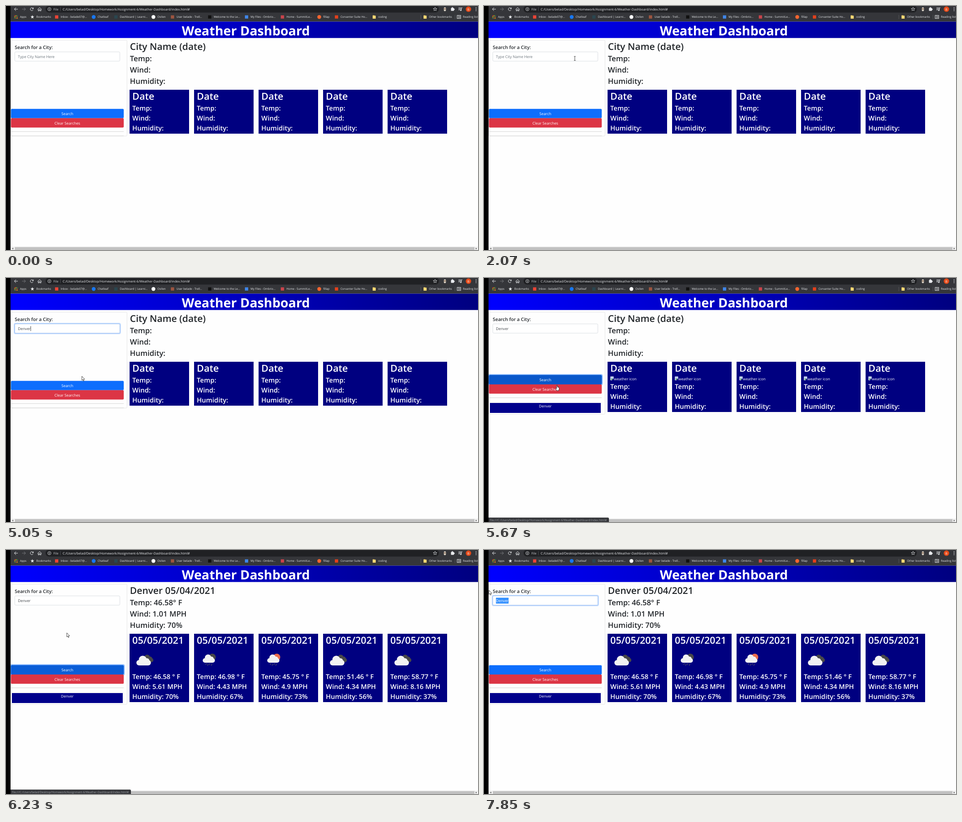
These frames come from a looping animation (1039x539 px, 8000 ms). An HTML page with a canvas:

```html
<!DOCTYPE html>
<html lang="en">
<head>
<meta charset="utf-8">
<title>Weather Dashboard</title>
<style>
  html, body { margin: 0; width: 100%; height: 100%; overflow: hidden; background: #fff; }
  canvas { display: block; width: 1039px; height: 539px; }
</style>
</head>
<body>
<canvas id="stage"></canvas>
<script>
const W = 1039, H = 539, LOOP = 8000;
const canvas = document.getElementById('stage');
const c = canvas.getContext('2d');
const dpr = window.devicePixelRatio || 1;
canvas.width = W * dpr;
canvas.height = H * dpr;

const FAMILY = '"Open Sans", "Noto Sans", sans-serif';
const PATH = 'C:/Users/belad/Desktop/Homework/Assignment-6/Weather-Dashboard/index.html#';
const INK = '#212529', PALE = '#e8eaed';

// Moments of the story, in ms
const FOCUS = 2220, HOVER = 5290, PRESS = 5500, LISTED = 5665, OVER_CLEAR = 5740,
      LEAVE = 6060, LOADED = 6225, DRAG = 7300;
const TYPED = [3170, 3400, 3470, 3640, 3870, 4040];

// Pointer moves: start, end, steps, target x, target y
const MOVES = [
  [140, 370, 4, 663, 423],
  [680, 1000, 5, 378, 236],
  [1230, 2000, 11, 200, 116],
  [2070, 2390, 5, 199, 114],
  [4730, 4880, 3, 167, 217],
  [5220, 5450, 4, 160, 237],
  [6060, 6290, 4, 129, 173],
  [6460, 7230, 11, 85, 113.5],
  [7300, 7690, 6, 4, 83],
  [7770, 7850, 2, 11, 89]
];

const FORECAST = [
  ['46.58', '5.61', 70, 'clouds'],
  ['46.98', '4.43', 67, 'night'],
  ['45.75', '4.9', 73, 'day'],
  ['51.46', '4.34', 56, 'clouds'],
  ['58.77', '8.16', 37, 'clouds']
];

// Bookmarks: icon x, text, icon shape, colour
const BOOKMARKS = [
  [22, 'Apps', 'grid'],
  [58, 'Bookmarks', 'star', PALE],
  [111.5, 'Inbox - belade07@...', 'square', '#ea4335'],
  [193, 'Chatleaf', 'disc', '#1877f2'],
  [242, 'Dashboard | Learni...', 'square', '#2a4650'],
  [324.5, 'Ovilen', 'disc', '#fff'],
  [366.5, 'User belade - Trell...', 'square', '#9c5540'],
  [448.5, 'Welcome to the Le...', 'square', '#111'],
  [529.5, 'My Files - Ombrio...', 'square', '#3f86e8'],
  [608.5, 'Home - SummitLe...', 'square', '#c9434b'],
  [689.5, 'fillap', 'disc', '#f4652f'],
  [727.5, 'Corvanter Suite Ho...', 'square', '#e2401b'],
  [810.5, 'coding', 'folder', '#f7d774'],
  [922.5, 'Other bookmarks', 'folder', '#f7d774'],
  [997, 'Reading list', 'list', PALE]
];

const ramp = (t, from, span = 150) => Math.min(1, Math.max(0, (t - from) / span));
const ease = k => k * k * (3 - 2 * k);

function font(size, weight = 400) {
  c.font = `${weight} ${size}px ${FAMILY}`;
}
function text(str, x, y, size, color, weight, align = 'left') {
  font(size, weight);
  c.textAlign = align;
  c.fillStyle = color;
  c.fillText(str, x, y);
}
function box(x, y, w, h, color) {
  c.fillStyle = color;
  c.fillRect(x, y, w, h);
}
function round(x, y, w, h, r) {
  c.beginPath();
  c.roundRect(x, y, w, h, r);
}
function fillRound(x, y, w, h, r, color) {
  round(x, y, w, h, r);
  c.fillStyle = color;
  c.fill();
}
function disc(x, y, r, color) {
  c.beginPath();
  c.arc(x, y, r, 0, 7);
  c.fillStyle = color;
  c.fill();
}
function trace(points) {
  c.beginPath();
  points.forEach(([x, y], i) => i ? c.lineTo(x, y) : c.moveTo(x, y));
}
function line(points, color, width = 1) {
  trace(points);
  c.strokeStyle = color;
  c.lineWidth = width;
  c.stroke();
}
function at(x, y, draw) {
  c.save();
  c.translate(x, y);
  draw();
  c.restore();
}
function starPath(r) {
  const pts = [];
  for (let i = 0; i < 10; i++) {
    const a = i * Math.PI / 5 - Math.PI / 2, d = i % 2 ? r * 0.42 : r;
    pts.push([Math.cos(a) * d, Math.sin(a) * d]);
  }
  trace(pts);
  c.closePath();
}

const ICONS = {
  grid() {
    const hues = ['#ea4335', '#fbbc04', '#34a853'];
    for (let i = 0; i < 9; i++) box(-3.6 + i % 3 * 2.7, -3.6 + (i / 3 | 0) * 2.7, 1.8, 1.8, hues[(i + (i / 3 | 0)) % 3]);
  },
  star(color) {
    starPath(4.3);
    c.fillStyle = color;
    c.fill();
  },
  square(color) { box(-3.6, -3.6, 7.2, 7.2, color); },
  disc(color) { disc(0, 0, 4.2, color); },
  folder(color) {
    fillRound(-3.4, -3.8, 4, 3, 0.6, '#d9b452');
    fillRound(-3.4, -3, 6.8, 6.8, 0.6, color);
  },
  list(color) {
    c.strokeStyle = color;
    c.lineWidth = 0.9;
    c.strokeRect(-4, -3.5, 8, 7);
    line([[-1.3, -3.5], [-1.3, 3.5]], color, 0.8);
    for (const y of [-1.6, 0, 1.6]) line([[0, y], [3, y]], color, 0.7);
  }
};

function toolbar() {
  box(10, 0, W - 10, 34.5, '#35363a');
  fillRound(87, -1, 866, 15.4, 7.7, '#202124');

  line([[26, 7], [18.5, 7]], PALE);
  line([[22, 3.4], [18.4, 7], [22, 10.6]], PALE);
  line([[35.5, 7], [43, 7]], '#77797d');
  line([[39.5, 3.4], [43.1, 7], [39.5, 10.6]], '#77797d');
  c.beginPath();
  c.arc(56.8, 7, 3.3, 0.5, 5.5);
  c.strokeStyle = PALE;
  c.lineWidth = 1;
  c.stroke();
  trace([[60.6, 3], [60.6, 6.6], [57, 6.6]]);
  c.fillStyle = PALE;
  c.fill();
  line([[69.6, 7.6], [74, 3.4], [78.4, 7.6]], PALE);
  line([[71, 7], [71, 10.8], [73, 10.8], [73, 8], [75, 8], [75, 10.8], [77, 10.8], [77, 7]], PALE);
  c.beginPath();
  c.arc(95.5, 7, 3.5, 0, 7);
  c.lineWidth = 0.8;
  c.stroke();
  box(95, 6.3, 1, 2.8, PALE);
  box(95, 4.8, 1, 1, PALE);
  text('File', 104.3, 9.6, 7.17, '#c4c7cb');
  box(119.5, 2.5, 0.7, 9, '#5f6368');
  text(PATH, 124.8, 9.6, 7.17, PALE);

  at(944.5, 7, () => {
    starPath(4.2);
    c.strokeStyle = PALE;
    c.lineWidth = 0.8;
    c.stroke();
  });
  fillRound(963.8, 2.8, 4.6, 8.6, 2.2, '#d8cfc2');
  box(963.8, 5.4, 4.6, 2.2, '#8b6f5a');
  fillRound(979.5, 4.2, 6.6, 6.6, 0.8, PALE);
  disc(982.6, 4, 1.4, PALE);
  disc(986.3, 7.4, 1.4, PALE);
  for (const y of [4, 6.3, 8.6]) line([[996, y], [y > 8 ? 999.4 : 1002, y]], PALE);
  line([[1002.3, 9.4], [1002.3, 4], [1004.8, 4]], PALE);
  disc(1001.2, 9.5, 1.4, PALE);
  disc(1018, 7, 6, '#e64a19');
  text('B', 1018, 9.5, 6.6, '#fff', 400, 'center');
  for (const y of [3.7, 7, 10.3]) disc(1034.7, y, 0.9, PALE);

  for (const [x, label, icon, color] of BOOKMARKS) {
    at(x, 24.2, () => ICONS[icon](color));
    text(label, x + 8.7, 26.4, 6.15, PALE);
  }
  box(912.6, 19.5, 0.7, 9.5, '#5f6368');
  box(988.3, 19.5, 0.7, 9.5, '#5f6368');
}

function banner() {
  const g = c.createLinearGradient(10, 0, W, 0);
  g.addColorStop(0, '#0000ff');
  g.addColorStop(1, '#000080');
  box(10, 34.5, W - 10, 36.2, g);
  text('Weather Dashboard', 528, 64.5, 28.3, '#fff', 700, 'center');
}

function searchField(t, pos) {
  const focus = t < DRAG ? ramp(t, FOCUS) * (1 - ramp(t, PRESS)) : ramp(t, DRAG);
  text('Search for a City:', 19.3, 95, 10.3, INK, 600);
  if (focus) fillRound(17.2, 99.2, 235.6, 24.8, 4, `rgba(13,110,253,${0.27 * focus})`);
  fillRound(19.2, 101.2, 231.6, 20.8, 2.2, '#fff');
  round(19.4, 101.4, 231.2, 20.4, 2.2);
  c.lineWidth = 0.6;
  c.strokeStyle = '#c3cad1';
  c.stroke();
  if (focus) {
    c.globalAlpha = focus;
    c.strokeStyle = '#86b7fe';
    c.stroke();
    c.globalAlpha = 1;
  }

  const x0 = 26.3, size = 8.25;
  const value = 'Denver'.slice(0, TYPED.filter(k => t >= k).length);
  if (value) text(value, x0, 115, size, '#41464b');
  else text('Type City Name Here', x0, 115, size, '#6c757d');

  font(size);
  const end = x0 + c.measureText(value).width;
  let caret = (t >= FOCUS && t < 2770) || (t >= TYPED[0] && t < 4500) || (t >= 5050 && t < PRESS);
  if (t >= DRAG) {
    let n = 0;
    while (n < value.length && x0 + c.measureText(value.slice(0, n + 1)).width < pos.x) n++;
    const from = x0 + c.measureText(value.slice(0, n)).width;
    caret = n === value.length;
    if (!caret) {
      box(from, 105.4, end - from, 13, '#3390ff');
      text(value.slice(n), from, 115, size, '#fff');
    }
  }
  if (caret) box(end, 106.2, 0.8, 11, INK);
}

// A button whose colour fades through [colour, alpha] layers
function button(label, y, ...layers) {
  for (const [color, alpha] of layers) {
    c.globalAlpha = alpha;
    fillRound(10.8, y, 248.4, 20.6, 2.2, color);
  }
  c.globalAlpha = 1;
  text(label, 135, y + 13.8, 8.25, '#fff', 400, 'center');
}

function panel(t, pos) {
  const listed = t >= LISTED;
  const bottom = t >= LOADED ? 341 : listed ? 301 : 287.2;
  const y = bottom - (listed ? 86.6 : 60);

  round(10.4, 75.3, 256, bottom - 75.3, 2.2);
  c.strokeStyle = '#dcdcdc';
  c.lineWidth = 0.7;
  c.stroke();
  searchField(t, pos);

  const blur = 1 - ramp(t, DRAG);
  const ring = ramp(t, PRESS) * blur;
  if (ring) fillRound(8.6, y - 2.1, 252.8, 24.8, 4, `rgba(49,132,253,${0.5 * ring})`);
  button('Search', y,
    ['#0d6efd', 1],
    ['#0b5ed7', ramp(t, HOVER) * blur],
    ['#0a58ca', ramp(t, PRESS) * (1 - ramp(t, LISTED + 15))]);
  button('Clear Searches', y + 20.6,
    ['#dc3545', 1],
    ['#bb2d3b', ramp(t, OVER_CLEAR) * (1 - ramp(t, LEAVE))]);

  box(10.8, y + 49.7, 248.4, 0.7, '#c4c4c4');
  box(10.8, y + 59.4, 248.4, 0.6, listed ? '#e8e8e8' : '#c4c4c4');
  if (listed) {
    box(13, y + 61.6, 244, 22, '#00008b');
    text('Denver', 135, y + 72, 8.25, '#fff', 400, 'center');
  }
  box(0, 0, 10, H, '#000');
}

function cloud(x, y, scale, color) {
  at(x, y, () => {
    c.scale(scale, scale);
    disc(6, 16, 6, color);
    disc(14, 9, 8.6, color);
    disc(23, 11.5, 5.6, color);
    disc(26, 16, 6, color);
    box(6, 12, 20, 10, color);
  });
}

function weather(kind, x) {
  if (kind === 'clouds') {
    cloud(x + 28, 231, 0.76, '#484848');
    cloud(x + 15, 233, 1, '#f2f2f2');
    return;
  }
  disc(x + 40, 236.8, 7.7, kind === 'day' ? '#ec6e4c' : '#484848');
  cloud(x + 19, 230.5, 0.84, '#f2f2f2');
  for (let i = 0; i < 4; i++) {
    const dx = x + 26 + i * 4, dy = 250 + i % 2 * 2;
    line([[dx + 1.3, dy], [dx - 0.4, dy + 3.4]], '#55555c', 1.3);
  }
}

function brokenImage(x, y) {
  fillRound(x, y, 7.2, 8.4, 0.6, '#f1f3f4');
  box(x + 0.8, y + 0.8, 5.6, 6.8, '#b9cdf2');
  trace([[x + 0.8, y + 7.6], [x + 3.4, y + 4], [x + 6.4, y + 7.6]]);
  c.fillStyle = '#4c9a4e';
  c.fill();
  trace([[x + 7.2, y + 3.4], [x + 7.2, y + 8.4], [x + 3.4, y + 8.4]]);
  c.fillStyle = '#000080';
  c.fill();
}

function report(t) {
  const loaded = t >= LOADED, listed = t >= LISTED;
  const now = loaded
    ? ['Denver 05/04/2021', 'Temp: 46.58° F', 'Wind: 1.01 MPH', 'Humidity: 70%']
    : ['City Name (date)', 'Temp:', 'Wind:', 'Humidity:'];
  now.forEach((s, i) => text(s, 272.8, i ? 97.6 + i * 24.8 : 97, i ? 16.5 : 20.7, INK, 600));

  const shift = loaded ? 54 : listed ? 14 : 0;
  FORECAST.forEach(([temp, wind, hum, kind], i) => {
    const x = 272 + i * 142;
    box(x, 185, 131, 97 + shift, '#000080');
    text(loaded ? '05/05/2021' : 'Date', x + 6.1, 207, 21.2, '#fff', 600);
    const rows = loaded
      ? [`Temp: ${temp} ° F`, `Wind: ${wind} MPH`, `Humidity: ${hum}%`]
      : ['Temp:', 'Wind:', 'Humidity:'];
    rows.forEach((s, k) => text(s, x + 6.1, 230.8 + shift + k * 22.1, 14.6, '#fff', 600));
    if (loaded) weather(kind, x);
    else if (listed) {
      brokenImage(x + 6.2, 217.5);
      text('weather icon', x + 14, 226, 8.25, '#fff');
    }
  });
}

function footer(t) {
  box(10, 531.4, W - 10, 7.6, '#f1f1f1');
  box(19.4, 532.6, 1012, 6.4, '#c1c1c1');
  trace([[16, 533.7], [13.6, 535.8], [16, 537.9]]);
  c.fillStyle = '#505050';
  c.fill();
  trace([[1034, 533.7], [1036.4, 535.8], [1034, 537.9]]);
  c.fill();
  const show = ramp(t, HOVER + 80, 120) * (1 - ramp(t, 6440, 200));
  if (!show) return;
  c.globalAlpha = show;
  fillRound(10, 529.2, 265, 12, [0, 2.2, 0, 0], '#35363a');
  text('file:///' + PATH, 13, 537, 6.15, '#a4a8ad');
  c.globalAlpha = 1;
}

function pointerAt(t) {
  let x = 864, y = 512;
  for (const [start, end, steps, tx, ty] of MOVES) {
    if (t < start) break;
    const step = Math.floor((t - start) / (end - start) * (steps - 1) + 1e-6);
    const k = ease(Math.min(1, (step + 1) / steps));
    x += (tx - x) * k;
    y += (ty - y) * k;
  }
  return { x, y };
}

function outlined(points) {
  trace(points);
  c.closePath();
  c.fillStyle = '#fff';
  c.fill();
  c.strokeStyle = '#000';
  c.lineWidth = 0.7;
  c.lineJoin = 'round';
  c.stroke();
}

function pointer(t, { x, y }) {
  if (t < 140) return;
  const overField = t >= 2070 && x > 19 && x < 251 && y > 101 && y < 122;
  const overButton = t >= HOVER && t < LOADED && y > 214;
  at(x, y, () => {
    if (overField) {
      line([[0, -4.4], [0, 4.4]], '#333', 0.9);
      for (const s of [-4.5, 4.5]) line([[-2, s], [2, s]], '#333', 0.8);
    } else if (overButton) {
      outlined([[0, 0], [1.6, 0], [1.8, 4], [5, 4.8], [5.4, 6], [5.2, 9], [4.4, 11.8],
        [0.2, 11.8], [-2.2, 7.6], [-2, 6.4], [-0.2, 7.4]]);
    } else {
      outlined([[0, 0], [0, 9], [2, 7.2], [3.4, 10.5], [4.8, 9.9], [3.5, 6.7], [6.2, 6.5]]);
    }
  });
}

function render(t) {
  c.setTransform(dpr, 0, 0, dpr, 0, 0);
  c.textRendering = 'geometricPrecision';
  box(0, 0, W, H, '#fefefe');
  const pos = pointerAt(t);
  toolbar();
  banner();
  report(t);
  panel(t, pos);
  footer(t);
  pointer(t, pos);
}

const begin = performance.now();
function tick() {
  render((performance.now() - begin) % LOOP);
  requestAnimationFrame(tick);
}
tick();
</script>
</body>
</html>
```
